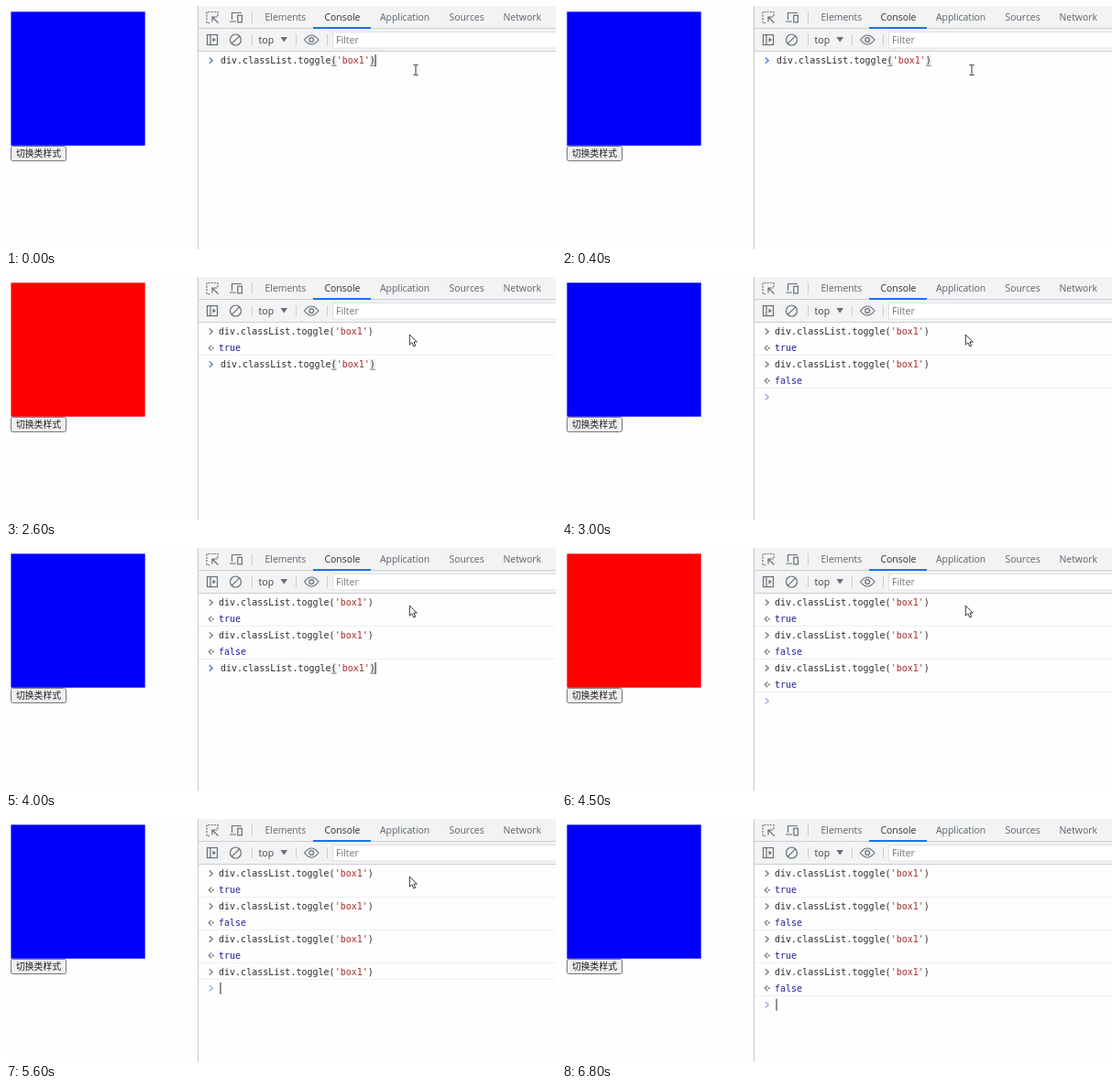
These frames come from a looping animation (600x266 px, 7.1 s). An HTML page:

```html
<!DOCTYPE html>
<html lang="zh">
<head>
<meta charset="utf-8">
<title>classList.toggle</title>
<style>
  html, body { margin: 0; height: 100%; overflow: hidden; background: #fefefe; }
  svg { display: block; width: 100vw; height: 100vh; }
  .ui { font: 10.4px "Open Sans", "Noto Sans", sans-serif; fill: #5f6368; }
  .code { font: 10.03px "DejaVu Sans Mono", monospace; fill: #2c2c2c; }
  .str { fill: #a82c2c; }
  .bool { fill: #24209a; }
  .icon { fill: none; stroke: #6a6e73; stroke-width: 1.2; }
  .rule { stroke: #cbced2; stroke-width: 1; }
  .mark { fill: none; stroke: #6e6e6e; stroke-width: 1.2; }
</style>
</head>
<body>
<svg viewBox="0 0 600 266">
  <rect id="box" x="5.4" y="6.3" width="146.3" height="146.5"/>
  <rect x="5.5" y="153.5" width="60" height="16" rx="2" fill="#efefef" stroke="#767676"/>
  <text x="11" y="165.2" font-family="'Noto Sans CJK SC', 'Noto Sans CJK', sans-serif" font-size="9.8" fill="#1c1c1c">切换类样式</text>

  <rect x="210" width="390" height="49" fill="#f1f3f4"/>
  <path class="rule" d="M210 24.5H600M210 49.5H600M268.5 6V19M268.5 31V43M316.5 31V43M350.5 31V43"/>
  <path d="M209.5 0V266" stroke="#c6c9cc"/>
  <rect x="335" y="23" width="63" height="2" fill="#1a73e8"/>
  <rect x="356.500" y="28.5" width="250" height="17.5" fill="#fff" stroke="#dfe1e5"/>

  <g class="ui">
    <text x="282.5" y="16">Elements</text>
    <text x="347.5" y="16" fill="#303236">Console</text>
    <text x="408" y="16">Application</text>
    <text x="483.5" y="16">Sources</text>
    <text x="542.5" y="16">Network</text>
    <text x="275.5" y="40.6" font-size="10.6" fill="#404347">top</text>
    <text x="360" y="41" font-size="10.6" fill="#757575">Filter</text>
  </g>
  <path d="M299.5 34H307L303.2 39.5Z" fill="#6a6e73"/>

  <g class="icon">
    <path d="M231 11V6.5H219V18.5H223" stroke-dasharray="2 1.3"/>
    <path d="M225 12L231.5 18.5M225 17.5V12H230.5"/>
    <path d="M246.5 15V7.5H257M244 17H251"/>
    <rect x="252.8" y="10.2" width="4.6" height="7.6"/>
    <rect x="219.5" y="31.5" width="11" height="11"/>
    <path d="M223 31.5V42.5"/>
    <path d="M225.5 34.5L229 37L225.5 39.5Z" fill="#6a6e73" stroke="none"/>
    <circle cx="250.5" cy="37" r="6"/>
    <path d="M246.3 41.2L254.7 32.8"/>
    <path d="M325.5 37Q333.2 27 341 37Q333.2 47 325.5 37Z"/>
    <circle cx="333.2" cy="37" r="2.4"/>
  </g>

  <g id="console"></g>
  <path id="ibeam" d="M444.5 64.5H446.5L447 65L447.5 64.5H449.5M447 65V75M444.5 75.5H446.5L447 75L447.5 75.5H449.5" fill="none" stroke="#333"/>
  <path id="arrow" d="M0 0V11.2L2.6 8.8L4.5 13L6.4 12.2L4.6 8.1H8Z" fill="#fff" stroke="#222" stroke-width=".9"/>
</svg>
<script>
const LOOP = 7100, ADVANCE = 6.04;

// [start ms, printed rows, input: 0 empty / 1 typed / 2 brackets matched, caret]
const steps = [
  [0, 0, 2, 1], [400, 0, 2, 0],
  [1100, 1, 0, 1], [1200, 2, 0, 1], [1600, 2, 0, 0],
  [1800, 2, 1, 1], [1900, 2, 2, 1], [2400, 2, 2, 0],
  [3000, 4, 0, 0], [3100, 4, 0, 1], [3600, 4, 0, 0],
  [3900, 4, 1, 1], [4000, 4, 2, 1],
  [4500, 6, 0, 0], [4600, 6, 0, 1], [5100, 6, 0, 0],
  [5200, 6, 1, 1], [5300, 6, 2, 1],
  [5600, 7, 0, 1], [5700, 8, 0, 1], [6300, 8, 0, 0], [6800, 8, 0, 1]
];

const $ = id => document.getElementById(id);
const rowY = i => 59.7 + 17.95 * i;
const text = (x, y, body, cls = '') =>
  `<text class="code"><tspan class="${cls}" x="${x}" y="${y + 3.6}">${body}</tspan></text>`;
const command = (x, y) =>
  text(x, y, `div.classList.toggle(<tspan class="str">'box1'</tspan>)`);
const chevron = (y, style = '') =>
  `<path class="mark" style="${style}" d="M221.8 ${y - 3.2}l3.5 3.2l-3.5 3.2"/>`;
const returned = y =>
  `<path class="mark" d="M224.3 ${y - 3}l-3 3l3 3"/><circle cx="225.8" cy="${y}" r="1" fill="#6e6e6e"/>`;

function printedRow(i, count) {
  const y = rowY(i), isResult = i % 2;
  const line = isResult || i === count - 1
    ? `<path d="M210 ${Math.floor(y + 8) + .5}H600" stroke="#eef0f5"/>` : '';
  return line + (isResult
    ? returned(y) + text(232, y, i % 4 === 1 ? 'true' : 'false', 'bool')
    : chevron(y) + command(232, y));
}

function bracketBox(index, y) {
  const x = 234 + index * ADVANCE;
  return `<rect x="${x}" y="${y - 6}" width="6" height="12" fill="#ececec"/>` +
    `<path d="M${x} ${y + 5.7}h6" stroke="#8a8a8a"/>`;
}

function prompt(row, input, caret) {
  const y = rowY(row);
  let out = chevron(y, `stroke:${input ? '#3672e0' : '#8ca6e4'}`);
  if (input === 2) out += bracketBox(20, y) + bracketBox(27, y);
  if (input) out += command(234, y);
  if (caret) out += `<rect x="${input ? 402.6 : 233.5}" y="${y - 6.5}" width="1" height="13" fill="#222"/>`;
  return out;
}

let shown;
function showStep(step) {
  if (step === shown) return;
  shown = step;
  const [, rows, input, caret] = step;
  $('box').setAttribute('fill', Math.ceil(rows / 2) % 2 ? '#f00' : '#00f');
  $('console').innerHTML =
    Array.from({ length: rows }, (_, i) => printedRow(i, rows)).join('') + prompt(rows, input, caret);
}

function showPointer(t) {
  const tick = Math.floor(t / 100) * 100;
  const p = Math.max(0, (tick - 6200) / 500) ** 1.5;
  $('ibeam').style.display = t < 1100 ? '' : 'none';
  $('arrow').style.display = t >= 1100 && t < 6800 ? '' : 'none';
  $('arrow').setAttribute('transform', `translate(${440.3 + 142 * p} ${63 + 190 * p})`);
}

function frame() {
  const t = performance.now() % LOOP;
  showStep(steps.findLast(s => s[0] <= t));
  showPointer(t);
  requestAnimationFrame(frame);
}
frame();
</script>
</body>
</html>
```
